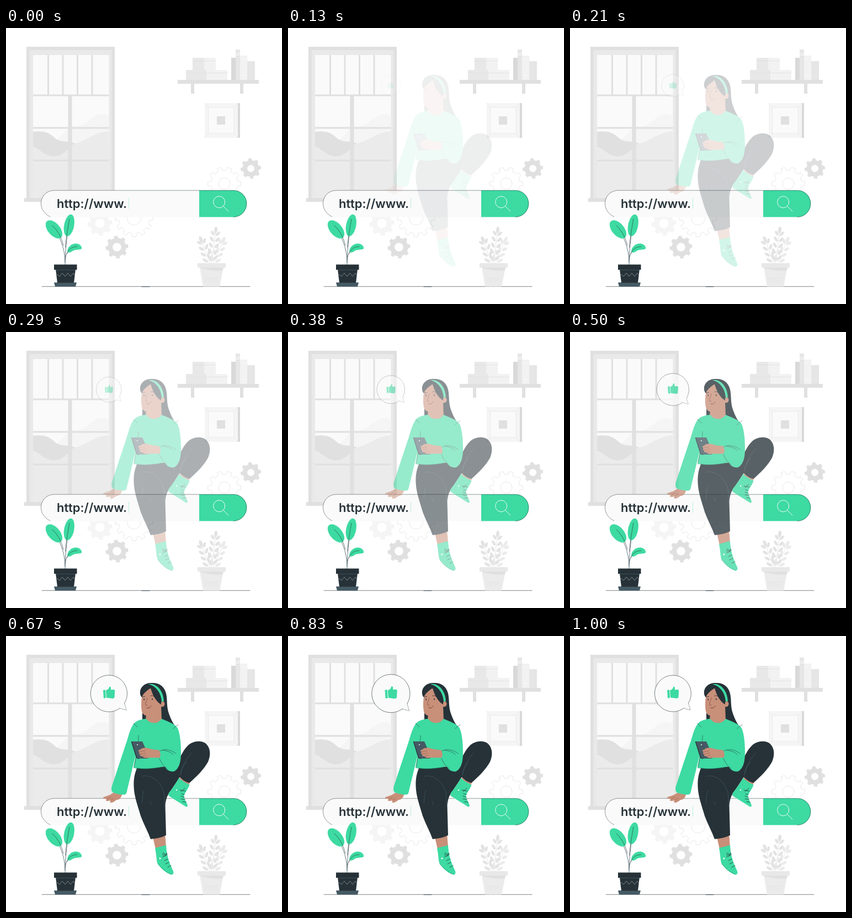
These frames come from a looping animation (500 px wide and 500 px high, 1.04 s). An HTML page with a canvas:

```html
<!DOCTYPE html>
<html lang="en">
<head>
<meta charset="utf-8">
<title>Search</title>
<style>
  html, body { margin: 0; width: 100%; height: 100%; overflow: hidden; background: #fff; }
  canvas { display: block; width: 500px; height: 500px; }
</style>
</head>
<body>
<canvas id="stage"></canvas>
<script>
const SIZE = 500, LOOP = 1040, STEP = 1000 / 24;
const GREEN = '#3ddaa2', DARK = '#263238', SLATE = '#455a64', SKIN = '#c88f79';
const G1 = '#e0e0e0', G2 = '#ebebeb', G3 = '#f2f2f2', G4 = '#fafafa';
const dpr = window.devicePixelRatio || 1;

function layer(canvas) {
  canvas.width = canvas.height = SIZE * dpr;
  const ctx = canvas.getContext('2d');
  ctx.scale(dpr, dpr);
  ctx.lineCap = ctx.lineJoin = 'round';
  return ctx;
}

const stage = layer(document.getElementById('stage'));
const back = layer(document.createElement('canvas'));
const figure = layer(document.createElement('canvas'));
const bubble = layer(document.createElement('canvas'));

let c = back;

function fill(d, color) {
  c.fillStyle = color;
  c.fill(new Path2D(d));
}
function line(d, color, width = 0.6) {
  c.strokeStyle = color;
  c.lineWidth = width;
  c.stroke(new Path2D(d));
}
function box(x1, y1, x2, y2, color) {
  c.fillStyle = color;
  c.fillRect(x1, y1, x2 - x1, y2 - y1);
}
function oval(x, y, rx, ry, deg, color) {
  c.fillStyle = color;
  c.beginPath();
  c.ellipse(x, y, rx, ry, deg * Math.PI / 180, 0, 2 * Math.PI);
  c.fill();
}
function ring(x, y, r, color, width) {
  c.strokeStyle = color;
  c.lineWidth = width;
  c.beginPath();
  c.arc(x, y, r, 0, 2 * Math.PI);
  c.stroke();
}

function gear(x, y, r, teeth, hole, color, outlined, turn = 0) {
  const root = r * 0.81, pitch = 2 * Math.PI / teeth;
  c.beginPath();
  for (let i = 0; i < teeth; i++) {
    const a = i * pitch + turn;
    c.arc(x, y, root, a - pitch * 0.5, a - pitch * 0.28);
    c.arc(x, y, r, a - pitch * 0.2, a + pitch * 0.2);
    c.arc(x, y, root, a + pitch * 0.28, a + pitch * 0.5);
  }
  c.closePath();
  if (outlined) {
    c.fillStyle = '#fff';
    c.fill();
    c.strokeStyle = color;
    c.lineWidth = 0.7;
    c.stroke();
    ring(x, y, hole, color, 0.7);
  } else {
    c.fillStyle = color;
    c.fill();
    oval(x, y, hole, hole, 0, '#fff');
  }
}

function drawWindow() {
  box(37, 34, 197, 309, G1);
  box(42.5, 40, 191.5, 309, '#e9e9e9');
  box(49, 49, 186.5, 309, G4);
  fill('M92 202C104 194 112 178 122 178C137 179 145 172 155 164C167 155 177 153 186.500 160V215H92Z', '#f5f5f5');
  fill('M49 215C62 220 76 235 96 230C109 228 114 216 125 209C143 207 164 186 186.500 188V309H49Z', G2);
  fill('M49 188C65 186 77 188 87 198C99 209 109 203 125 209C113 216 108 230 90 232C73 235 63 220 49 215Z', G1);
  for (let i = 0; i < 4; i++) box(75 + i * 26.5, 49, 78 + i * 26.5, 121, G1);
  for (const y of [120.5, 179.5, 238.5]) box(49, y, 186.5, y + 3, G1);
  box(112.5, 122, 119.5, 309, G1);
  box(33, 308, 201, 315, G1);
}

function drawShelf() {
  box(311, 94, 458, 101, G1);
  box(335, 101, 341, 119, G1);
  box(424, 101, 430, 119, G1);
  box(338, 54, 359, 76, '#e8e8e8');
  box(359, 54, 380, 76, G3);
  box(326, 76, 363, 94, '#e8e8e8');
  box(363, 76, 401, 94, G3);
  line('M338 59.500H380M326 81.500H401', '#dedede', 0.7);
  box(408, 54, 416, 94, '#d9d9d9');
  box(416, 39, 424, 94, '#e6e6e6');
  box(424, 50, 437, 94, G3);
  box(437, 60, 451, 94, '#e6e6e6');
  line('M416 46H424M416 49H424M427 56H434M427 86H434', G4, 1);
}

function drawPicture() {
  box(360, 136, 420, 199, '#f5f5f5');
  box(420, 136, 424, 199, '#d9d9d9');
  box(367, 144, 413, 191, G4);
  line('M367 144H413V191H367ZM360 136L367 144M420 136L413 144M360 199L367 191M420 199L413 191', '#e6e6e6', 0.8);
  box(382, 160, 397, 175, G1);
}

function drawBar() {
  fill('M88 294H350V342.500H88A24.250 24.250 0 0 1 88 294Z', G4);
  fill('M350 294H412A24.250 24.250 0 0 1 412 342.500H350Z', GREEN);
  line('M80 342C70 337 63.500 329 63.500 318C63.500 304 74 294.200 88 294.200H412C425 294.200 435.800 305 435.800 318C435.800 331 425 342.300 412 342.300', DARK, 0.5);
  ring(386.2, 315.3, 10.5, '#fff', 0.9);
  line('M393.700 322.800L403 332.200', '#fff', 0.9);
  c.fillStyle = DARK;
  c.font = '600 22px Inter, "Open Sans", sans-serif';
  c.fillText('http://www.', 92, 326.2);
  line('M222.500 308.500V327', '#b4eedc', 0.9);
}

function drawPlant() {
  line('M107 429C108 408 101 380 85 361M107 425C107 404 111 375 114 350M107 420C109 407 114 399 128 396', SLATE, 0.8);
  oval(87, 364.8, 19.5, 11, 50, GREEN);
  oval(114.3, 357.5, 20, 9, -79, GREEN);
  fill('M111 404C112 396 120 389.500 128 390.500C134 391 138 396 137 400C132 403 125 400 119 405C115 408 111 407 111 404Z', GREEN);
  line('M84 358C95 368 101 381 104 394M115 346C112 362 109 379 107.500 397M129 396C120 396 114 400 110 409', DARK, 0.6);
  fill('M87 461H128L126 468.500H89Z', SLATE);
  fill('M90 437H126L123 461.500H93Z', DARK);
  box(87, 428.5, 128.5, 438, DARK);
  line('M92 446L97 450L102 444L107 450L112 444L117 450L122 444L124 447', '#9aa5aa', 0.7);
  line('M91 438.500H125', '#5a6a72', 0.5);
}

function branch(x, y, dx, dy, pairs, color) {
  const tilt = Math.atan2(dy, dx) * 180 / Math.PI;
  const len = Math.hypot(dx, dy), nx = -dy / len, ny = dx / len;
  line(`M${x} ${y}l${dx} ${dy}`, color, 0.9);
  for (let i = 0; i < pairs; i++) {
    const p = 0.2 + 0.7 * i / (pairs - 1), s = 6.2 - p * 1.6;
    for (const side of [-1, 1]) {
      oval(x + dx * p + nx * side * s, y + dy * p + ny * side * s, s, 2.5, tilt + side * 38, color);
    }
  }
  oval(x + dx, y + dy, 6, 3, tilt, color);
}

function drawPottedBranches() {
  branch(370, 428, -17, -45, 4, '#e3e3e3');
  branch(375, 428, 19, -44, 4, G2);
  branch(372, 428, 8, -62, 5, '#e3e3e3');
  fill('M351 433H394L387 468.500H357Z', G2);
  fill('M351.500 434H394L393 439C378 441 365 438 352 435Z', G1);
  box(347, 426, 398, 434, '#e8e8e8');
  line('M358 453H386M360 460L364 453L368 460L372 453L376 460L380 453L384 460', '#e2e2e2', 0.7);
}

function drawRoom() {
  c = back;
  box(0, 0, SIZE, SIZE, '#fff');
  drawWindow();
  drawShelf();
  drawPicture();
  gear(395.5, 282, 30, 10, 10.5, '#dedede', true, 0);
  gear(443.5, 254.5, 18.5, 8, 6.5, G1, false, -0.1);
  gear(232, 344.5, 34, 12, 12.5, '#dedede', true, 0);
  gear(170, 354, 22.5, 8, 8.5, '#f5f5f5', false, -0.1);
  gear(201, 397, 20.5, 8, 7.8, G1, false, -0.1);
  drawBar();
  line('M65 468.300H442', DARK, 0.6);
  line('M246 468.700H260', DARK, 0.8);
  drawPlant();
  drawPottedBranches();
}

function drawLegs() {
  fill('M316 253L334 264L330 272L313 263Z', SKIN);
  fill('M265 360L288 358L290 381L271 386Z', SKIN);
  fill('M238 237C234 247 231 256 231.500 272C232 291 239 308 244 326C249 340 257 354 262 368C272 367 282 365 290 361L288.500 307C289 299 291 292 294 287L315 255.500C320 261 326 265 332.500 266C346 254 359 241 366 228C372 214 370 201 361 194C351 188 337 191 329 199C322 206 318 215 313 224L290 237Z', DARK);
  fill('M313 257.500C319 262 325 266 332.500 269.500C330 278 322 286 322.500 291C324 298 328 302 329 307C329 310 326 310 323 308C314 302 304 296 295 290C294 288 294 286 295 284C302 275 308 267 313 257.500Z', GREEN);
  fill('M270 384L290 379C291 397 295 409 303 426C304.500 430 302.500 433.500 298 432C288 428 281 421 275 413C272 408 273 398 270 384Z', GREEN);
  line('M295 290C304 296 314 302 325 308.500', '#fff', 0.6);
  line('M275 412.500C281 420 290 428 300 432', '#1f8766', 0.5);
  line('M317 282L324 276M315 279L325 281M318 286L323 287M317 290L323 292M317 295L324 296M320 300L326 301', DARK, 0.8);
  line('M285 398C282 392 287 391 288 397C292 390 294 394 288 399M284 400L292 396M287 407L293 404M289 413L295 410M293 419L299 416', DARK, 0.8);
  oval(279, 403, 1.4, 1.4, 0, '#fff');
  oval(309, 279, 1.2, 1.2, 0, '#fff');
  line('M247 254C263 250 281 264 286 284C288 295 286 301 288 308M336 212C327 222 319 235 316 250M250 280C246 288 248 295 246 302M261 300L263 306M316 252C317 242 323 234 327 228', SLATE, 0.7);
}

function drawTorso() {
  fill('M195 284L210 287C209 293 205 297 200 297C197 299 194 302 190 302C187 301 189 299 190 298L183 299C180 298 180 296 183 295L178 295C175 294 175 292 179 291C186 289 190 287 195 284Z', SKIN);
  line('M183 295L190 292M189.500 298L195 294', '#8a5546', 0.6);
  fill('M254 140L281 125L282 153C279 160 260 160 253 152Z', SKIN);
  fill('M254 150C247 150.500 240 152 235 155.500C227 161 223 177 219 190L191.500 273C190.500 279 191 282 195 284C203 287 212 288 216 287C219 285 219 281 220 277L235.500 213L231 238.500C248 242 271 240 287 236C291 243 298 247 305 245C314 240 317 227 317 212C317 192 315 176 311 167C307 160 294 155 282 150C278 155 274 157.500 268 157.500C261 157.500 257 154 254 150Z', GREEN);
  line('M231 158L238 165M312 161C309 162 306 164 303 168M240 180C240 194 238 205 236 215C235 224 233 231 232 237M277 210C284 203 298 205 308 213M278 222C282 231 286 236 292 240M284 207C292 208 299 210 303 215', DARK, 0.55);
  line('M232 238.800C249 242 271 240 287 236.500', '#1f8766', 0.6);
}

function drawPhone() {
  fill('M227 191L247 191L259 218C259 221 257 222 254 222H240C237 222 236 220 235 217Z', SLATE);
  line('M227.500 191.500L236 219Q237 222 241 222', DARK, 1.2);
  oval(238, 197, 1, 1, 0, '#fff');
  fill('M277 206.500C269 206 261 205 255 202.500C250 202 245 203 243 206C239 206 239 209 242 210C240 212 241 214 243 214C242 217 244 218 247 218C249 221 253 221.500 258 220.500L278 220.500C281 217 280 211 277 206.500Z', SKIN);
  line('M242 210L252 208M243 214L253 212M247 218L254 216', '#8a5546', 0.6);
}

function drawHead() {
  fill('M243 104C242 93 251 85 263 85C277 84 287 91 290 104C293 117 290 128 296 143C299 151 302 157 305 161C299 162 288 158 281 150L281 120L250 113C246 112 243 108 243 104Z', DARK);
  fill('M247 134V151L255 151L262 140Z', DARK);
  fill('M261 95C254 99 246 106 245.500 114C244.500 124 245 136 247.500 140C251 146 261 146 270 141L281 140L281 128C288 130 290 120 284 118C283 118 282 119 281 120C273 117 266 107 264 96Z', SKIN);
  fill('M262 94C267 98 270 108 281 113V124C274 120 266 110 262 94Z', DARK);
  fill('M262 93C257 99 250 101 246 111C242 106 243 97 252 93Z', DARK);
  fill('M258 87C271 84.500 285 97 286 118L282 119C281 104 273 91 258 87Z', GREEN);
  line('M255 144.600C261 145.500 267 144 271 140.500', '#7a4638', 1.1);
  oval(250.2, 115, 0.9, 1.4, 0, DARK);
  oval(265, 114.5, 0.9, 1.4, 0, DARK);
  line('M247.500 110.500L251.500 109.500M262 108.500C264 107.500 267 108 269 110', DARK, 0.9);
  line('M256 112C255 117 252 122 253 125L256 125.500', '#7a4638', 0.7);
  line('M255 130C258 131.500 261 130 263 126.500', '#6b3329', 0.9);
}

function drawFigure() {
  c = figure;
  drawLegs();
  drawHead();
  drawTorso();
  drawPhone();
}

function drawBubble(scale) {
  c = bubble;
  c.clearRect(0, 0, SIZE, SIZE);
  c.save();
  c.translate(186, 104.6);
  c.scale(scale, scale);
  c.translate(-186, -104);
  const rim = 'M206 130.200A33 33 0 1 1 214.500 121';
  const tail = 'L218 133.500L206 130.200';
  fill(rim + tail, G4);
  line(rim, DARK, 0.6);
  line('M214.500 121' + tail, DARK, 0.4);
  fill('M176 97.500L180 97L181 111.500L177 112Z', GREEN);
  fill('M181 98C184 97 187 95 187 91.500C189 90.500 190.500 92 190 97L195 96.500Q198 97 197 101L196.500 110.500Q196 112.500 193 112.500L182 111Z', GREEN);
  c.restore();
}

function render(time) {
  const t = time % LOOP;
  stage.drawImage(back.canvas, 0, 0, SIZE, SIZE);
  if (t < 130) return;

  // Time advances in hard 24 fps ticks: 13 to appear, then a small swell of the bubble.
  const tick = Math.floor((t - 122) / STEP) + 1;
  const shown = Math.min(tick / 13, 1);
  const phase = Math.max(0, Math.min((tick - 13) / 9, 1));
  const swell = 0.05 * Math.sin(Math.PI * phase) ** 2;

  drawBubble(0.5 + 0.5 * shown + swell);
  stage.globalAlpha = shown;
  stage.drawImage(figure.canvas, 0, 0, SIZE, SIZE);
  stage.drawImage(bubble.canvas, 0, 0, SIZE, SIZE);
  stage.globalAlpha = 1;
}

drawRoom();
drawFigure();

const start = performance.now();
function loop() {
  render(performance.now() - start);
  requestAnimationFrame(loop);
}
loop();
</script>
</body>
</html>
```
